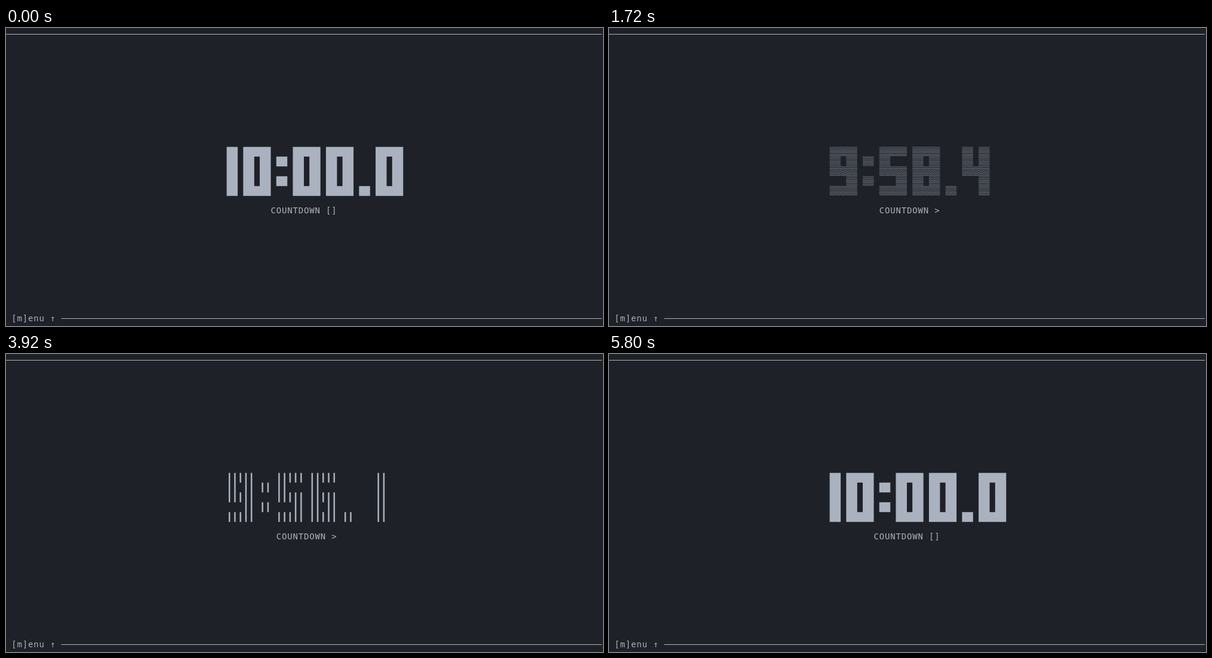
These frames come from a looping animation (1000x500 px, 6080 ms). An HTML page:

```html
<!DOCTYPE html>
<html lang="en">
<head>
<meta charset="utf-8">
<title>Countdown</title>
<style>
  html, body { margin: 0; width: 100%; height: 100%; overflow: hidden; background: #1e2127; }
  svg { display: block; width: 1000px; height: 500px; }
  text { font: 14px "DejaVu Sans Mono", monospace; letter-spacing: 0.81px; white-space: pre; }
</style>
</head>
<body>
<svg viewBox="0 0 1000 500" fill="#abb2bf">
  <rect width="1000" height="500" fill="#1e2127"/>
  <rect y="10" width="998" height="1"/>
  <rect x="92.4" y="487" width="905.6" height="1"/>
  <text x="9.24" y="492">[m]enu ↑</text>
  <text id="label" y="311.1"></text>
  <path id="clock"/>
</svg>
<script>
const LOOP = 6080, FRAME = 40, RESET = 5800;
const CW = 9.24, CH = 16.45, TOP = 2, CLOCK_ROW = 12;
const PX = CW / 11, PY = CH / 20; // one terminal pixel

// Rows of five cells, as bit masks
const FULL = 31, SIDES = 27, LEFT = 24, RIGHT = 3;
const GLYPHS = {
  0: [FULL, SIDES, SIDES, SIDES, FULL],
  1: [RIGHT, RIGHT, RIGHT, RIGHT, RIGHT],
  2: [FULL, RIGHT, FULL, LEFT, FULL],
  3: [FULL, RIGHT, FULL, RIGHT, FULL],
  4: [SIDES, SIDES, FULL, RIGHT, RIGHT],
  5: [FULL, LEFT, FULL, RIGHT, FULL],
  6: [FULL, LEFT, FULL, SIDES, FULL],
  7: [FULL, RIGHT, RIGHT, RIGHT, RIGHT],
  8: [FULL, SIDES, FULL, SIDES, FULL],
  9: [FULL, SIDES, FULL, RIGHT, FULL],
  ':': [0, 3, 0, 3, 0],
  '.': [0, 0, 0, 0, 3]
};

const n2 = v => v.toFixed(2);
const rect = (x, y, w, h) => `M${n2(x)} ${n2(y)}h${n2(w)}v${n2(h)}h${n2(-w)}z`;
const dot = (x, y, r) => `M${n2(x - r)} ${n2(y)}a${r} ${r} 0 1 1 ${2 * r} 0a${r} ${r} 0 1 1 ${-2 * r} 0z`;

// Shade built from a repeating pixel pattern
const shade = rows => (x, y) => {
  let d = '';
  for (let j = 0; j < 20; j++) {
    const row = rows[j % rows.length];
    for (let i = 0; i < 11; i++) {
      if (row[i % row.length] === '1') d += rect(x + i * PX, y + j * PY, PX, PY);
    }
  }
  return d;
};

function braille(x, y) {
  let d = '';
  for (let j = 0; j < 4; j++) {
    for (const dx of [-2.2, 2.2]) d += dot(x + CW / 2 + dx, y + CH / 2 + (j - 1.5) * 3.7, 0.9);
  }
  return d;
}

function cross(x, y) {
  const gap = 1.4, w = 0.85, armX = CW / 2 - gap, armY = CH / 2 - gap;
  let d = '';
  for (const sy of [-1, 1]) {
    const ly = y + CH / 2 + sy * gap - w / 2;
    for (const sx of [-1, 1]) {
      const lx = x + CW / 2 + sx * gap - w / 2;
      d += rect(sx < 0 ? x : x + CW - armX, ly, armX, w);
      d += rect(lx, sy < 0 ? y : y + CH - armY, w, armY);
    }
  }
  return d;
}

const STYLES = [
  (x, y) => rect(x, y, CW, CH),
  shade(['01', '11', '10', '11']),
  shade(['10', '00', '01', '00']),
  shade(['1000', '0000', '0010', '0000']),
  braille,
  (x, y) => rect(x + CW / 2 - 1.25, y, 2.5, CH),
  cross
];

// Tenths tick in bursts of seven; the first six bursts also switch the style
const EVEN = [0, 3, 5, 8, 10, 13, 15];
const QUICK = [0, 3, 5, 7, 10, 12, 14];
const EARLY = [0, 2, 5, 7, 10, 12, 15];
const BURSTS = [
  [240, EVEN], [920, EVEN], [1600, EVEN], [2320, QUICK], [2960, QUICK],
  [3640, QUICK], [4320, EVEN], [5000, EARLY], [5680, [0]]
];
const ticks = BURSTS.flatMap(([start, offsets]) => offsets.map(o => start + o * FRAME));
const switches = BURSTS.slice(0, 6).map(([start, offsets]) => start + (offsets[6] - 1) * FRAME);
const passed = (times, t) => times.filter(s => s <= t).length;

function timeText(tenths) {
  const sec = Math.floor(tenths / 10);
  return `${Math.floor(sec / 60)}:${String(sec % 60).padStart(2, '0')}.${tenths % 10}`;
}

function clockPath(text, cell) {
  let col = text.length > 6 ? 37 : 40, d = '';
  for (const ch of text) {
    const width = ch === ':' || ch === '.' ? 2 : 5;
    GLYPHS[ch].forEach((bits, row) => {
      for (let i = 0; i < width; i++) {
        if (bits >> (width - 1 - i) & 1) d += cell((col + i) * CW, TOP + (CLOCK_ROW + row) * CH);
      }
    });
    col += width + 1;
  }
  return d;
}

const label = document.getElementById('label');
const clock = document.getElementById('clock');
let shown = '';

function draw(t) {
  const running = t < RESET;
  const count = running ? passed(ticks, t) : 0;
  const style = running ? passed(switches, t) : 0;
  const key = count + '/' + style;
  if (key === shown) return;
  shown = key;
  clock.setAttribute('d', clockPath(timeText(6000 - count), STYLES[style]));
  label.setAttribute('x', (count ? 49 : 48) * CW);
  label.textContent = count ? 'COUNTDOWN >' : 'COUNTDOWN []';
}

const begin = performance.now();
function loop() {
  draw((performance.now() - begin) % LOOP);
  requestAnimationFrame(loop);
}
loop();
</script>
</body>
</html>
```
